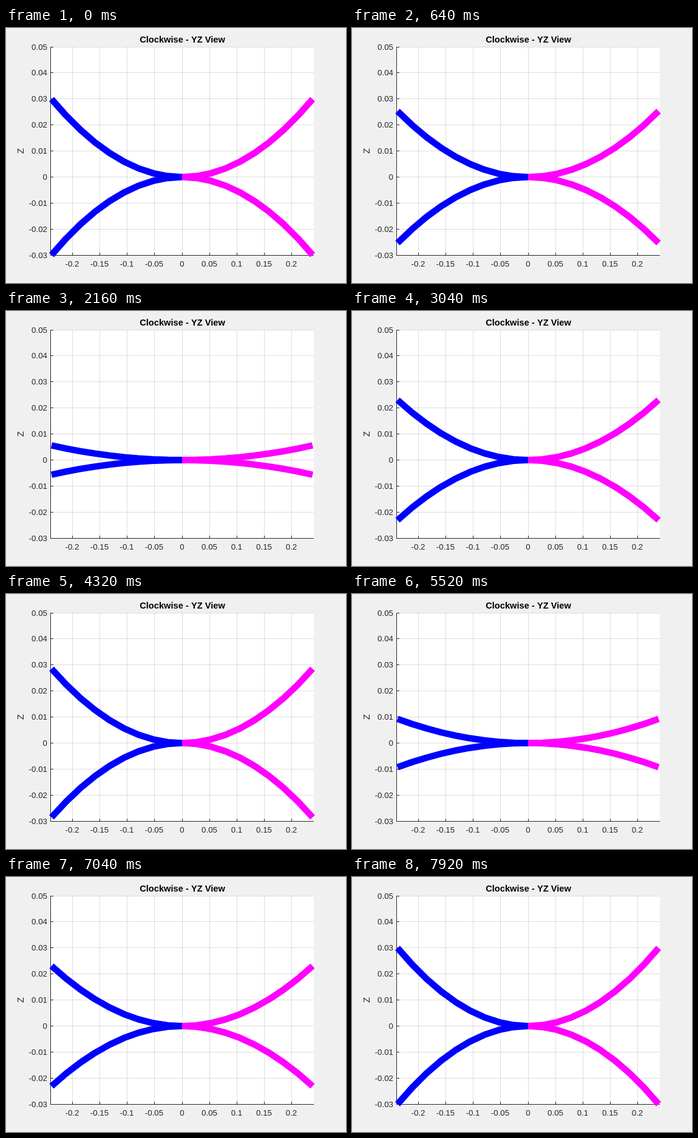
An HTML page with a canvas that plays this animation: 560 by 420 pixels, repeating every 8 s.

```html
<!DOCTYPE html>
<html lang="en">
<head>
<meta charset="utf-8">
<title>Clockwise - YZ View</title>
<style>
  html, body { margin: 0; width: 100%; height: 100%; overflow: hidden; background: #f0f0f0; }
  canvas { display: block; }
</style>
</head>
<body>
<canvas id="stage" width="560" height="420"></canvas>
<script>
const ctx = document.getElementById('stage').getContext('2d');
const FONT = '"Liberation Sans", Arial, sans-serif';
const LEFT = 73, RIGHT = 506, TOP = 31, BOTTOM = 374;
const STEP_MS = 80, STEPS = 100;
const SEGMENTS = 9, REACH = 215, LIFT = 128.6;

const px = y => 290 + y * 433 / 0.48;
const py = z => 245.4 + -z * 343 / 0.08;
const crisp = v => Math.floor(v) + 0.5;

function line(x1, y1, x2, y2, color) {
  ctx.strokeStyle = color;
  ctx.beginPath();
  ctx.moveTo(x1, y1);
  ctx.lineTo(x2, y2);
  ctx.stroke();
}

function text(str, x, y, align, font, color = '#262626') {
  ctx.font = `${font} ${FONT}`;
  ctx.textAlign = align;
  ctx.fillStyle = color;
  ctx.fillText(str, x, y);
}

function drawAxes() {
  const left = LEFT + 0.5, bottom = BOTTOM + 0.5;
  const xTicks = Array.from({ length: 9 }, (_, i) => (i - 4) * 5 / 100);
  const zTicks = Array.from({ length: 9 }, (_, i) => (i - 3) / 100);

  ctx.fillStyle = '#f0f0f0';
  ctx.fillRect(0, 0, 560, 420);
  ctx.fillStyle = '#fff';
  ctx.fillRect(LEFT, TOP, RIGHT - LEFT + 1, BOTTOM - TOP + 1);

  ctx.lineWidth = 1;
  const grid = 'rgba(38, 38, 38, 0.15)', ink = '#262626';
  for (const v of xTicks) line(crisp(px(v)), TOP, crisp(px(v)), BOTTOM, grid);
  for (const v of zTicks) line(LEFT, crisp(py(v)), RIGHT + 1, crisp(py(v)), grid);

  line(left, TOP, left, BOTTOM + 1, ink);
  line(LEFT, bottom, RIGHT + 1, bottom, ink);
  for (const v of xTicks) {
    const x = crisp(px(v));
    line(x, bottom, x, bottom - 4.5, ink);
    text(String(v), x - 0.5, 393, 'center', '13.33px');
  }
  for (const v of zTicks) {
    const y = crisp(py(v));
    line(left, y, left + 4.5, y, ink);
    text(String(v), 68, y + 4.5, 'right', '13.33px');
  }

  text('Clockwise - YZ View', 290.5, 24, 'center', 'bold 14.67px', '#000');
  ctx.save();
  ctx.translate(29, 202.5);
  ctx.rotate(-Math.PI / 2);
  text('Z', 0, 0, 'center', '14.67px');
  ctx.restore();
}

// A parabolic arm bending away from the centre
function drawArm(side, bend, color) {
  ctx.strokeStyle = color;
  ctx.beginPath();
  for (let i = 0; i <= SEGMENTS; i++) {
    const u = i / SEGMENTS;
    ctx.lineTo(290 + side * REACH * u, 245.5 - bend * LIFT * u * u);
  }
  ctx.stroke();
}

function draw(now) {
  const step = Math.floor(now / STEP_MS) % STEPS;
  const bend = Math.cos(2 * Math.PI * (step + 1) / STEPS);
  drawAxes();
  ctx.lineWidth = 10.67;
  ctx.lineJoin = 'round';
  for (const [side, color] of [[-1, '#00f'], [1, '#f0f']]) {
    drawArm(side, bend, color);
    drawArm(side, -bend, color);
  }
}

const start = performance.now();
function tick() {
  draw(performance.now() - start);
  requestAnimationFrame(tick);
}
tick();
</script>
</body>
</html>
```
